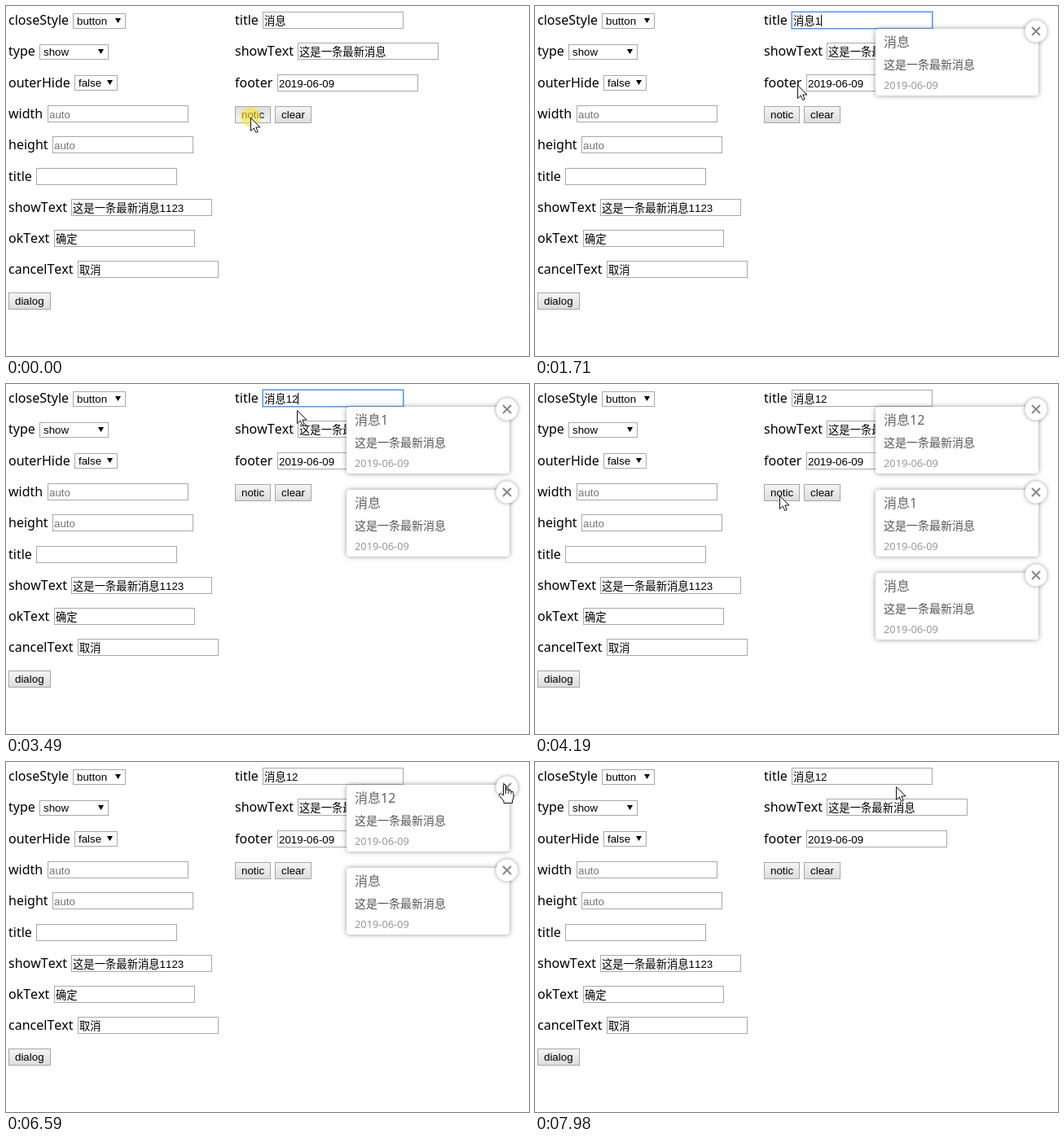
Recreate the animation shown at these times as an HTML page with a canvas. Size 642x430 px, loop 8000 ms.

```html
<!DOCTYPE html>
<html lang="zh">
<head>
<meta charset="utf-8">
<title>notice demo</title>
<style>
html, body { margin: 0; width: 100%; height: 100%; overflow: hidden; background: #fff; }
canvas { display: block; }
</style>
</head>
<body>
<canvas id="stage" width="642" height="430"></canvas>
<script>
const ctx = document.getElementById('stage').getContext('2d');
ctx.fontKerning = 'none';
const LOOP = 8000;
const PRESS_TIME = 150;
const NOTICE_TOP = 28, NOTICE_PITCH = 102;
const FORM_FONT = '13.333px "Liberation Sans", "Noto Sans CJK SC", sans-serif';
const pageFont = size => `${size}px "Noto Sans", "Noto Sans CJK SC", sans-serif`;

const NOTIC = { x: 300, y: 137, opens: true };
const FIELD = { x: 365, y: 18, focuses: true };
const REST = { x: 443, y: 30 };
const closeOf = index => ({ x: 612, y: 27 + NOTICE_PITCH * index, closes: index });

// Each step glides to a target and may click it; a bow bends the way there.
const STEPS = [
  { leave: 0, arrive: 0, to: NOTIC, release: 70 },
  { leave: 760, arrive: 1310, to: FIELD, release: 1460, types: '1' },
  { leave: 1538, arrive: 1950, to: NOTIC, release: 2410 },
  { leave: 2560, arrive: 2914, to: FIELD, release: 3030, types: '2' },
  { leave: 3455, arrive: 4030, to: NOTIC, release: 4190 },
  { leave: 4720, arrive: 5440, to: closeOf(1), release: 5670, bow: [0, 32] },
  { leave: 6050, arrive: 6590, to: closeOf(0), release: 6820, bow: [-14, 0] },
  { leave: 6900, arrive: 7060, to: closeOf(0), release: 7230 },
  { leave: 7230, arrive: 7900, to: REST, release: Infinity, bow: [-105, 25] },
];

function stateAt(t) {
  const state = { notices: [], title: '消息', focused: false, pressed: false };
  for (const { to, release, types } of STEPS) {
    if (t < release - PRESS_TIME) break;
    state.focused = Boolean(to.focuses);
    state.pressed = t < release;
    if (state.pressed) break;
    if (to.opens) state.notices.unshift(state.title);
    if (to.closes !== undefined) state.notices.splice(to.closes, 1);
    if (types && t >= release + 80) state.title += types;
  }
  return state;
}

function pointerAt(t) {
  const index = STEPS.findLastIndex(step => step.leave <= t);
  const { leave, arrive, to, bow = [0, 0] } = STEPS[index];
  const from = STEPS[Math.max(0, index - 1)].to;
  const u = t < arrive ? (t - leave) / (arrive - leave) : 1;
  const eased = 1 - (1 - u) ** 2;
  const bend = Math.sin(Math.PI * eased);
  return [
    Math.round(from.x + (to.x - from.x) * eased + bow[0] * bend),
    Math.round(from.y + (to.y - from.y) * eased + bow[1] * bend),
  ];
}

function text(value, x, y, font = FORM_FONT, color = '#000') {
  ctx.font = font;
  ctx.fillStyle = color;
  ctx.fillText(value, x, y);
  return ctx.measureText(value).width;
}

function box(x, y, w, h, fill, border) {
  ctx.fillStyle = fill;
  ctx.fillRect(x, y, w, h);
  frame(x, y, w, h, border);
}

function frame(x, y, w, h, color) {
  ctx.strokeStyle = color;
  ctx.lineWidth = 1;
  ctx.strokeRect(x + .5, y + .5, w - 1, h - 1);
}

const rowTop = row => 7 + 38.3 * row;

// Draws a label and returns the left edge of the control that follows it.
function label(name, x, row) {
  return Math.round(x + text(name, x, Math.round(rowTop(row)) + 16, pageFont(16)) + 5.4);
}

function select(name, row, value, width) {
  const x = label(name, 3, row), y = Math.floor(rowTop(row)) + 2;
  box(x, y, width, 19, '#fff', '#a9a9a9');
  text(value, x + 5, y + 14);
  const right = x + width - 6;
  ctx.beginPath();
  ctx.moveTo(right - 7, y + 6);
  ctx.lineTo(right, y + 6);
  ctx.lineTo(right - 3.5, y + 12);
  ctx.fill();
}

function input(name, left, row, value, { hint = false, focused = false } = {}) {
  const x = label(name, left, row), y = Math.round(rowTop(row));
  box(x, y, 173, 21, '#fff', focused ? '#5a96f0' : '#a9a9a9');
  const width = text(value, x + 2, y + 16, FORM_FONT, hint ? '#757575' : '#000');
  if (focused) {
    frame(x - 1, y - 1, 175, 23, '#a2c4fa');
    ctx.fillRect(Math.round(x + 2 + width), y + 4, 1, 14);
  }
  return { x, y };
}

// Returns the left edge for a button standing next to this one.
function button(name, x, row, pressed = false) {
  const y = Math.round(rowTop(row) + .7);
  ctx.font = FORM_FONT;
  const width = Math.round(ctx.measureText(name).width + 16);
  const shade = ctx.createLinearGradient(0, y, 0, y + 21);
  shade.addColorStop(pressed ? 1 : 0, '#f6f6f6');
  shade.addColorStop(pressed ? 0 : 1, '#dcdcdc');
  box(x, y, width, 21, shade, '#a6a6a6');
  text(name, x + 8, y + 15);
  return x + width + 5;
}

function shadowed(blur, trace) {
  ctx.save();
  ctx.shadowColor = 'rgba(0,0,0,.4)';
  ctx.shadowBlur = blur;
  ctx.fillStyle = '#fff';
  ctx.beginPath();
  trace();
  ctx.fill();
  ctx.restore();
}

function notice(title, index) {
  const y = NOTICE_TOP + NOTICE_PITCH * index;
  shadowed(6, () => ctx.roundRect(418, y, 200, 82, 4));
  text(title, 428, y + 22, pageFont(16), '#666');
  text('这是一条最新消息', 428, y + 49, pageFont(14), '#555');
  text('2019-06-09', 428, y + 74, pageFont(12.8), '#999');
  shadowed(5, () => ctx.arc(615, y + 3, 13.5, 0, 7));
  ctx.strokeStyle = '#888';
  ctx.lineWidth = 2;
  ctx.beginPath();
  for (const d of [-5, 5]) {
    ctx.moveTo(615 - d, y - 2);
    ctx.lineTo(615 + d, y + 8);
  }
  ctx.stroke();
}

const ARROW = new Path2D('M.5 .5V16.5L4.3 13 6.7 18.5 9.2 17.4 6.8 12H12Z');
const HAND = new Path2D('M-1.5 14V2Q-1.5 .5 0 .5T1.5 2V7Q4.5 6 4.8 8.2 7.5 7 8 9.3 11 8.5 11 11.5V16Q11 18 9.5 20V23.5H-1V21L-6 14.5Q-7.3 12.5-6 11.8-4.5 11.2-3 13Z');
const KNUCKLES = new Path2D('M1.5 7V12M4.8 8.2V12M8 9.3V12.5');
const BEAM = new Path2D('M-3 -8.5H-1L.5 -7.5 2 -8.5H4M.5 -7.5V7.5M-3 8.5H-1L.5 7.5 2 8.5H4');

function pointer(x, y, { pressed, notices }, fields) {
  const overClose = notices.some((_, i) =>
    Math.hypot(x - 615, y - 31 - NOTICE_PITCH * i) < 20);
  const overField = fields.some(f => x >= f.x && x < f.x + 173 && y >= f.y && y < f.y + 21);
  ctx.save();
  ctx.translate(x, y);
  if (pressed) {
    ctx.fillStyle = 'rgba(250,228,50,.62)';
    ctx.beginPath();
    ctx.arc(.5, -.5, 12, 0, 7);
    ctx.fill();
  }
  ctx.fillStyle = '#fff';
  ctx.strokeStyle = '#112';
  ctx.lineWidth = 1;
  const shape = overClose ? HAND : overField ? BEAM : ARROW;
  if (shape !== BEAM) ctx.fill(shape);
  ctx.stroke(shape);
  if (overClose) ctx.stroke(KNUCKLES);
  ctx.restore();
}

function draw(t) {
  const state = stateAt(t);
  const [x, y] = pointerAt(t);
  ctx.fillStyle = '#fff';
  ctx.fillRect(0, 0, 642, 430);

  select('closeStyle', 0, 'button', 65);
  select('type', 1, 'show', 85);
  select('outerHide', 2, 'false', 53);
  input('width', 3, 3, 'auto', { hint: true });
  input('height', 3, 4, 'auto', { hint: true });
  input('title', 3, 5, '');
  input('showText', 3, 6, '这是一条最新消息1123');
  input('okText', 3, 7, '确定');
  input('cancelText', 3, 8, '取消');
  button('dialog', 3, 9);

  const fields = [
    input('title', 281, 0, state.title, { focused: state.focused }),
    input('showText', 281, 1, '这是一条最新消息'),
    input('footer', 281, 2, '2019-06-09'),
  ];
  const overNotic = Math.hypot(x - NOTIC.x, y - NOTIC.y) < 10;
  button('clear', button('notic', 281, 3, state.pressed && overNotic), 3);

  state.notices.forEach(notice);
  pointer(x, y, state, fields);
}

const begin = performance.now();
function tick() {
  draw((performance.now() - begin) % LOOP);
  requestAnimationFrame(tick);
}
tick();
</script>
</body>
</html>
```
